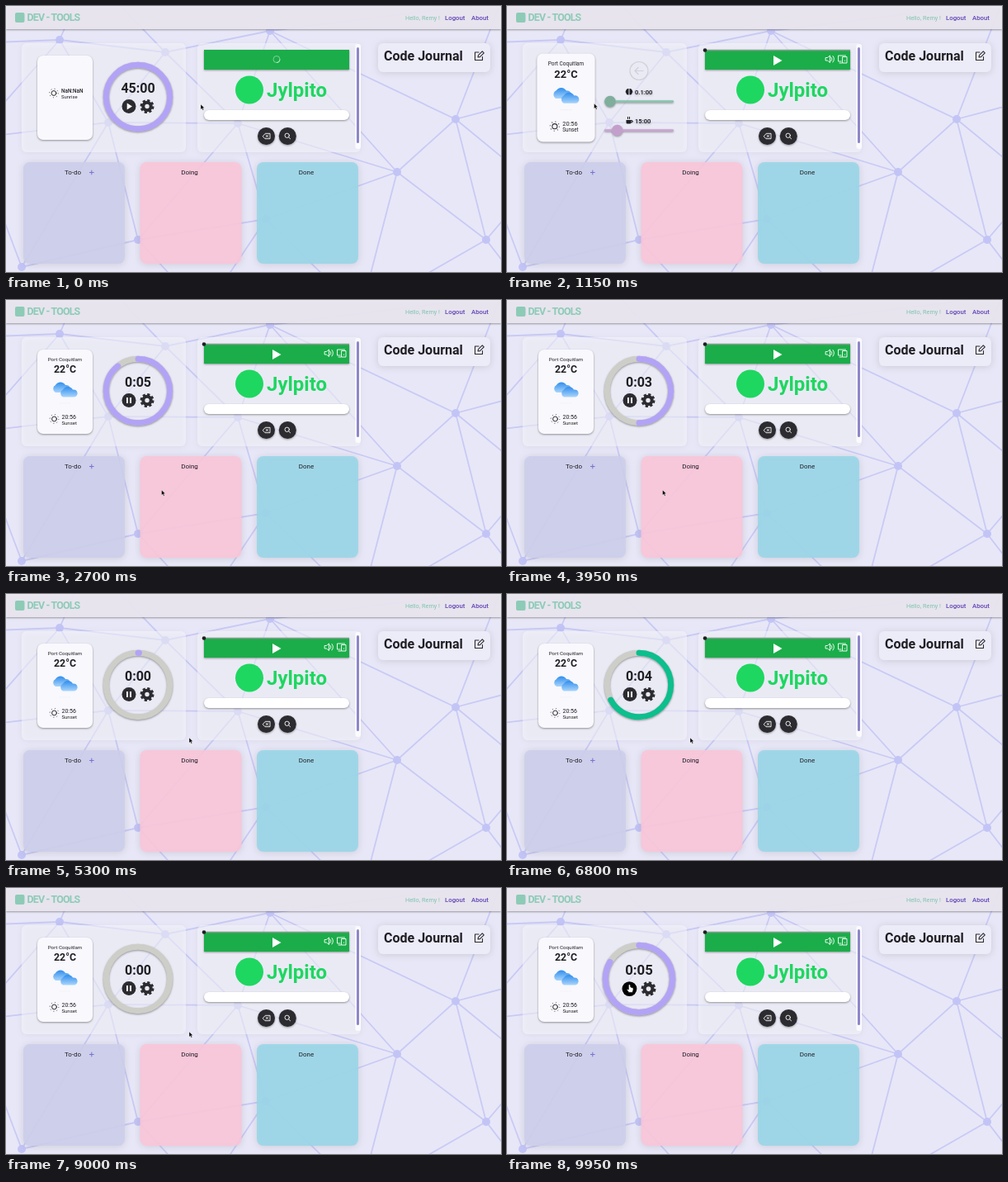
These frames come from a looping animation (600 px wide and 322 px high, 10000 ms). An HTML page:

```html
<!DOCTYPE html>
<html lang="en">
<head>
<meta charset="utf-8">
<title>Dev tools dashboard</title>
<style>
  html, body { margin: 0; width: 100%; height: 100%; overflow: hidden; background: #e8e7f7; }
  svg { display: block; width: 100vw; height: 100vh; font-family: Roboto, sans-serif; fill: #1f1f24; }
  .mid { text-anchor: middle; }
  .line { fill: none; stroke: #2b2b30; stroke-linecap: round; stroke-linejoin: round; }
  .white { stroke: #fff; stroke-width: .9; }
  .soft { filter: drop-shadow(0 1px 4px #5553); }
  .lift { filter: drop-shadow(0 1px 1px #4448); }
  .panel { fill: #f6f6fe; fill-opacity: .55; filter: drop-shadow(0 1px 3px #5552); }
  .dark { fill: #2b2b30; }
</style>
</head>
<body>
<svg viewBox="0 0 600 322">
  <defs>
    <linearGradient id="sky" x2="0" y2="1">
      <stop stop-color="#318eee"/><stop offset="1" stop-color="#a9d5fb"/>
    </linearGradient>
    <path id="cloud" d="M5 14a5 5 0 0 1 0-9 7 7 0 0 1 12 0 4.500 4.500 0 0 1 2 9z" fill="url(#sky)"/>
    <g id="sun" class="line" stroke-width="1">
      <circle r="2.900"/>
      <circle r="5.300" stroke-dasharray=".9 3.260" stroke-linecap="butt"/>
    </g>
  </defs>

  <g id="web" fill="#c3c4f6" stroke="#c9caf5" stroke-width="1.800"></g>

  <g id="header">
    <rect width="600" height="28" fill="#ece9f4" fill-opacity=".95" class="lift"/>
    <rect x="11" y="8" width="11.500" height="12" rx="2" fill="#8dcbb6"/>
    <text x="25.500" y="18.300" font-size="12.400" font-weight="700" letter-spacing="-.8" fill="#8dcbb6">DEV - TOOLS</text>
    <text x="484" y="16.600" font-size="7.300" fill="#7fc4ad">Hello, Remy !</text>
    <g font-size="7.800" font-weight="500" fill="#6145b5">
      <text x="532" y="16.600">Logout</text>
      <text x="564" y="16.600">About</text>
    </g>
  </g>

  <rect class="panel" x="19" y="45" width="199" height="132" rx="6"/>
  <rect class="panel" x="232" y="45" width="198" height="132" rx="6"/>

  <g id="journal">
    <rect class="soft" x="451" y="45" width="136" height="35" rx="6" fill="#ecebf8"/>
    <text x="458" y="66" font-size="16" font-weight="600">Code Journal</text>
    <path class="line" stroke-width="1.100" d="M573 56h-4.500v9.500h9v-4M572 62l.5-2.400 4.800-4.800 2 2-4.800 4.800z"/>
  </g>

  <g id="board" class="mid" font-size="8"></g>

  <g id="weather">
    <rect class="lift" x="38" y="60" width="67" height="102" rx="7" fill="#f8f8fd"/>
    <g id="loading">
      <use href="#sun" x="58" y="105.500"/>
      <text x="67" y="104.500" font-size="6.300" font-weight="500">NaN:NaN</text>
      <text x="67" y="111.500" font-size="5.900">Sunrise</text>
    </g>
    <g id="forecast">
      <g class="mid">
        <text x="71.500" y="73.500" font-size="6.200">Port Coquitlam</text>
        <text x="71.500" y="88" font-size="12.300" font-weight="600">22°C</text>
      </g>
      <use href="#cloud" x="55" y="98"/>
      <use href="#cloud" x="64" y="103.500"/>
      <path d="M65 125h14" stroke="#ddd" stroke-width=".5" stroke-dasharray="1"/>
      <use href="#sun" x="58.500" y="144"/>
      <text x="67.500" y="143.500" font-size="7">20:56</text>
      <text x="67.500" y="150.500" font-size="6">Sunset</text>
    </g>
  </g>

  <g id="timer">
    <g transform="translate(160 110)">
      <g class="lift" fill="none" stroke-width="7">
        <circle r="38.700" stroke="#cecec9"/>
        <circle id="ring" r="38.700" pathLength="1" stroke-linecap="round" transform="rotate(-90)"/>
      </g>
      <text id="clock" class="mid" y="-5.200" font-size="16" font-weight="700"></text>
    </g>
    <g transform="translate(149 121.500)">
      <circle id="button" r="8.500"/>
      <path id="playIcon" d="M-2.300-4v8l6.300-4z" fill="#fff"/>
      <path id="pauseIcon" d="M-2-3.500v7M2-3.500v7" stroke="#fff" stroke-width="2"/>
    </g>
    <g transform="translate(171 121.500)" class="line" stroke-linecap="butt">
      <circle r="4.700" stroke-width="4"/>
      <circle r="7.200" stroke-width="2.600" stroke-dasharray="3.200 2.455" style="stroke-linecap:butt"/>
    </g>
  </g>

  <g id="settings" font-size="7.600" font-weight="500">
    <g class="line" style="stroke:#d0d0d6" stroke-width="1.200">
      <circle cx="160" cy="78.500" r="11"/>
      <path d="M165 78.500h-10l4-4M155 78.500l4 4"/>
    </g>
    <g id="sliders" class="lift"></g>
    <path d="M147.500 100v7.500q-3 0-3-2-1.500-2 0-4 1-2 3-1.500zm1 0v7.500q3 0 3-2 1.500-2 0-4-1-2-3-1.500z"/>
    <path d="M144.500 138h6v3q0 1.500-1.500 1.500h-3q-1.500 0-1.500-1.500zM146 134h1v3h-1zM148 134h1v3h-1z"/>
    <circle class="line" cx="151" cy="139.700" r="1.300"/>
  </g>

  <g id="music">
    <rect x="423.500" y="46" width="6.500" height="127" rx="3" fill="#fbfbfe"/>
    <rect x="425" y="50" width="3" height="116" rx="1.500" fill="#8d87c9"/>
    <rect class="lift" x="240" y="53" width="176" height="24" fill="#1aad49"/>
    <g id="spinner" fill="none" transform="translate(328 64.500)">
      <circle r="4" stroke="#7fd39a"/>
      <circle id="spinArc" r="4" pathLength="4" stroke="#b5e6c4" stroke-dasharray="1 3"/>
    </g>
    <g id="player">
      <path d="M240 53.500h176" stroke="#8a9a8e" stroke-width="1.500"/>
      <circle cx="240" cy="53.500" r="2.300"/>
      <path d="M323 60v12l10.500-6z" fill="#fff"/>
      <path class="line white" d="M386.500 62.500h2l3-2.500v8.500l-3-2.500h-2zM393 62q2 2 0 4.500M395 60.500q3 3.500 0 7.500"/>
      <path class="line white" d="M405 67h-3.500v-7h9M403 69h3M407 61.500h5v7.500h-5zM409.500 66v.3"/>
    </g>
    <circle cx="295" cy="101.500" r="17" fill="#1ed760"/>
    <text x="316" y="109.500" font-size="24" font-weight="700" fill="#1ed760">Jylpito</text>
    <rect class="lift" x="240" y="126" width="176" height="12" rx="6" fill="#fff"/>
    <g class="lift dark">
      <circle cx="315.500" cy="157.500" r="10.500"/>
      <circle cx="341.300" cy="157.500" r="10.500"/>
    </g>
    <path class="line white" d="M311.500 157.500l2.800-3.200h5.700v6.400h-5.700zM315 156.100l2.800 2.800M317.800 156.100l-2.800 2.800M342.600 158.800l2 2"/>
    <circle class="line white" cx="340.700" cy="156.800" r="2.700"/>
  </g>

  <g id="cursor" stroke="#fff">
    <path id="arrow" d="M0 0V6.300L1.500 5 2.600 7.300 3.700 6.800 2.600 4.600H4.600Z" fill="#000" stroke-width=".4"/>
    <path id="hand" d="M-1.700-4q1.200-1.300 2.200 0l.4 2.500 2.600.8q1 .7.600 2.400l-1 3.200h-4.400l-2.500-3.200q.4-1.500 2.100-.2z" fill="#fff" style="stroke:#000" stroke-width=".7"/>
  </g>
</svg>

<script>
const LOOP = 10000, TICK = 500, ROUND = 6, START = 2110;
const OPEN = 600, CLOSE = 1880;
const $ = id => document.getElementById(id);
const clamp = x => Math.max(0, Math.min(1, x));
const show = (id, on) => $(id).style.display = on ? '' : 'none';
const set = (id, name, value) => $(id).setAttribute(name, value);
const grow = (id, x, y, s) => set(id, 'transform', `translate(${x} ${y}) scale(${s}) translate(${-x} ${-y})`);

// Constellation: two stars are joined unless a third lies between them
const stars = [[65, 41], [193, 56], [320, 30], [124, 141], [281, 142], [160, 283], [19, 316],
  [315, 258], [474, 201], [545, 137], [582, 283],
  [100, -40], [600, -5], [640, 112], [640, 215], [630, 345], [430, 370], [240, 370], [-40, 45], [-40, 160]];
const dist = ([ax, ay], [bx, by]) => Math.hypot(ax - bx, ay - by);
const joined = (a, b) => {
  const middle = [(a[0] + b[0]) / 2, (a[1] + b[1]) / 2];
  return stars.every(s => s === a || s === b || dist(s, middle) > .45 * dist(a, b));
};
let links = '';
stars.forEach((a, i) => stars.slice(i + 1).forEach(b => { if (joined(a, b)) links += `M${a}L${b}`; }));
$('web').innerHTML = `<path d="${links}"/>` +
  stars.map(([x, y]) => `<circle cx="${x}" cy="${y}" r="5" stroke="none"/>`).join('');

const columns = { 'To-do': '#cecfeb', Doing: '#fac6da', Done: '#9bd6e8' };
$('board').innerHTML = Object.entries(columns).map(([name, color], i) => `
  <g transform="translate(${21 + i * 141.5} 189)">
    <rect class="soft" width="123" height="123" rx="8" fill="${color}" fill-opacity=".92"/>
    <text x="60" y="15">${name}</text>
  </g>`).join('') + '<path d="M101 201.500h5.600M103.800 198.700v5.600" stroke="#7673d2"/>';

const addSlider = (name, y, track, knob) => $('sliders').innerHTML += `
  <rect x="118" y="${y - 1.2}" width="84" height="2.400" rx="1.200" fill="${track}"/>
  <circle id="${name}Knob" cy="${y}" r="6.700" fill="${knob}"/>
  <text id="${name}Text" x="155" y="${y - 8.7}" style="filter:none"></text>`;
addSlider('work', 115.5, '#86c5ac', '#7fae9c');
addSlider('rest', 150.5, '#cba4d3', '#c3a0cc');

function setSlider(name, x) {
  const minutes = Math.round((x - 125) / 70 * 120);
  set(name + 'Knob', 'cx', x);
  $(name + 'Text').textContent = (minutes > 0 ? minutes : '0.1') + ':00';
}

// Pointer stops: arrival time, x, y
const play = [149, 121.5], gear = [171, 121.5], back = [160, 78.5];
const stops = [[0, 236, 119], [560, ...gear], [820, 151, 116], [1100, 105.5, 118], [1320, 133, 151],
  [1540, 112, 152], [1820, ...back], [2080, ...play], [2600, 188.5, 230], [5150, 222, 174], [9800, ...play]];

function pointer(t) {
  const i = stops.findLastIndex(stop => stop[0] <= t);
  const [t0, x0, y0] = stops[i], [t1, x1, y1] = stops[i + 1] || stops[i];
  const gap = t1 - t0 || 1;
  const p = clamp(1 - (t1 - t) / Math.min(500, gap * .7));
  const eased = gap === 1 ? 0 : p * p * (3 - 2 * p);
  return [x0 + (x1 - x0) * eased, y0 + (y1 - y0) * eased];
}

function countdown(t) {
  const n = Math.floor((t - START) / TICK);
  if (n < 0) return { label: t < OPEN ? '45:00' : '0:06', left: 1 };
  const now = ROUND - n % (ROUND + 1), before = n ? ROUND - (n - 1) % (ROUND + 1) : ROUND;
  const eased = 1 - (1 - clamp((t - START - n * TICK) / 250)) ** 2.3;
  return {
    label: '0:0' + now,
    left: (before + (now - before) * eased) / ROUND,
    resting: Math.floor(n / (ROUND + 1)) % 2
  };
}

function draw(t) {
  const [x, y] = pointer(t);
  const near = (spot, r) => dist([x, y], spot) < r;
  const inSettings = t >= OPEN && t < CLOSE;

  show('loading', t < 450);
  show('forecast', t >= 450);
  show('spinner', t < 700);
  show('player', t >= 700);
  set('spinArc', 'transform', `rotate(${t * .72})`);
  grow('weather', 71.5, 111, 1 + .05 * (y > 60 && y < 162 ? clamp((109 - x) / 3) : 0));

  show('timer', !inSettings);
  show('settings', inSettings);
  const { label, left, resting } = countdown(t);
  $('clock').textContent = label;
  set('ring', 'stroke', left < .001 ? 'none' : resting ? '#0cbf8d' : '#b3a3f6');
  set('ring', 'stroke-dasharray', `${left} 2`);
  show('playIcon', t < START);
  show('pauseIcon', t >= START && !near(play, 4));
  set('button', 'fill', near(play, 8.5) ? '#000' : '#2b2b30');
  grow('timer', 160, 110, 1 + .05 * clamp((44 - dist([x, y], [160, 110])) / 6));

  setSlider('work', t < 820 ? 151 : t < 1100 ? Math.max(125, x) : 125);
  setSlider('rest', t < 1320 ? 133.75 : t < 1540 ? Math.max(125, x) : 125);

  const clickable = inSettings ? near(back, 11) : near(play, 9) || near(gear, 9);
  set('cursor', 'transform', `translate(${x} ${y})`);
  show('arrow', !clickable);
  show('hand', clickable);
}

function frame() {
  draw(performance.now() % LOOP);
  requestAnimationFrame(frame);
}
frame();
</script>
</body>
</html>
```
